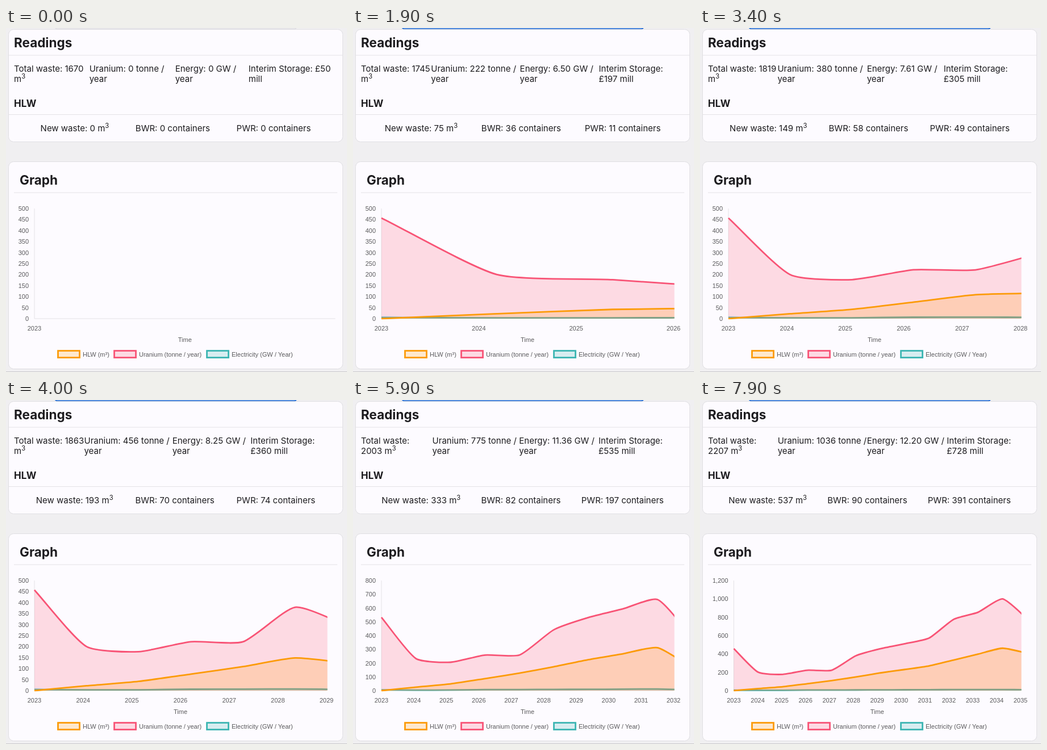
Animation of 600x606 px, one loop 8 s. Source, as an HTML page:

```html
<!DOCTYPE html>
<html lang="en">
<head>
<meta charset="utf-8">
<style>
  html, body { margin: 0; width: 100%; height: 100%; overflow: hidden; background: #f0eff1; }
  svg { display: block; width: 600px; height: 606px; }
  .ui { font: 15px Inter, sans-serif; fill: #1d1c1f; }
  .ui .head { font-size: 22.5px; font-weight: 700; }
  .ui .sub { font-size: 17px; font-weight: 700; }
  .ui .sup { font-size: 11.25px; }
  .chart { font: 11px "Liberation Sans", Arial, sans-serif; fill: #5a5a5c; }
  .card { fill: #fdfbff; stroke: #e0dfe3; }
  .rule { stroke: #e4e2e6; fill: none; }
</style>
</head>
<body>
<svg viewBox="0 0 600 606">
  <defs><clipPath id="area"><rect id="clip" y="316.5" height="197"/></clipPath></defs>
  <rect width="600" height="606" fill="#f0eff1"/>
  <rect id="ring" x="86" y="-20" width="425.5" height="21.3" rx="4" fill="#fdfbff" stroke-width="1.8"/>
  <rect class="card" x="4.5" y="2.5" width="588" height="198" rx="9"/>
  <rect class="card" x="4.5" y="235.5" width="588" height="365" rx="9"/>
  <path class="rule" d="M5 48H592M5 152.5H592M14 290H583"/>
  <path d="M0 605.5H600" stroke="#c9c8cb"/>
  <g class="ui">
    <text class="head" x="14" y="34">Readings</text>
    <text class="sub" x="14" y="138.7">HLW</text>
    <text class="head" x="24" y="276">Graph</text>
    <g id="readings"></g>
  </g>
  <g class="chart">
    <g id="axes"></g>
    <g id="plot" clip-path="url(#area)"></g>
    <g id="legend"></g>
  </g>
</svg>
<script>
const LOOP = 8000, ANIM = 1000, TOP = 318, BOTTOM = 512, RIGHT = 564, TENSION = 0.2;
const START_YEAR = 2023, RING_AT = 100;

// start ms, uranium, energy, HLW, BWR, PWR, storage cost
const YEARS = [
  [0, 457, 5.2, 0, 0, 0, 50],
  [190, 200, 3.4, 22, 12, 0, 97],
  [950, 177, 3.75, 42, 25, 1, 144],
  [1680, 222, 6.5, 75, 36, 11, 197],
  [2407, 222, 6.84, 109, 47, 29, 250],
  [3090, 380, 7.61, 149, 58, 49, 305],
  [3770, 456, 8.25, 193, 70, 74, 360],
  [4430, 510, 9.21, 230, 74, 103, 416],
  [5090, 573, 10.17, 270, 78, 138, 473],
  [5740, 775, 11.36, 333, 82, 197, 535],
  [6370, 853, 11.83, 397, 86, 256, 597],
  [6990, 1005, 12.03, 465, 88, 320, 662],
  [7600, 1036, 12.2, 537, 90, 391, 728]
].map(([at, uranium, energy, hlw, bwr, pwr, cost]) => ({ at, uranium, energy, hlw, bwr, pwr, cost }));

// bottom layer first
const SERIES = [
  { key: 'energy', color: '60,181,178', label: 'Electricity (GW / Year)', x: 353 },
  { key: 'uranium', color: '248,84,118', label: 'Uranium (tonne / year)', x: 190 },
  { key: 'hlw', color: '252,155,8', label: 'HLW (m³)', x: 91 }
];

const $ = id => document.getElementById(id);
const lerp = (a, b, p) => a + (b - a) * p;
const easeOutQuart = p => 1 - (1 - p) ** 4;
const pen = document.createElement('canvas').getContext('2d');
const text = (x, y, s, anchor = 'start') => `<text x="${x}" y="${y}" text-anchor="${anchor}">${s}</text>`;
const cubic = (x, y, s) => `${text(x, y, s + ' m')}`.replace('</text>', `<tspan class="sup" dy="-5.3">3</tspan></text>`);

function measure(s, hasCube) {
  pen.font = '15px Inter, sans-serif';
  const width = pen.measureText(s).width;
  if (!hasCube) return width;
  pen.font = '11.25px Inter, sans-serif';
  return width + pen.measureText('3').width;
}

function layout(k) {
  const peak = Math.max(...YEARS.slice(0, k + 1).map(y => y.uranium));
  const tick = peak <= 500 ? 50 : peak <= 1000 ? 100 : 200;
  const max = Math.ceil(peak / tick) * tick;
  const left = max > 1000 ? 59.5 : 50;
  return { tick, max, left, step: (RIGHT - left) / Math.max(k, 1) };
}

const place = (value, max) => BOTTOM - (BOTTOM - TOP) * value / max;

// Point positions at time t while year k is the newest one.
function points(k, t) {
  if (k === 0) return [];
  const before = points(k - 1, YEARS[k].at);
  const old = layout(k - 1), now = layout(k);
  const p = easeOutQuart(Math.min(1, (t - YEARS[k].at) / ANIM));
  return YEARS.slice(0, k + 1).map((year, i) => {
    const x = now.left + i * now.step;
    const from = before[i] || { x: k === 1 ? x : old.left + i * old.step, y: SERIES.map(() => BOTTOM) };
    return {
      x: lerp(from.x, x, p),
      y: SERIES.map((s, j) => lerp(from.y[j], place(year[s.key], now.max), p))
    };
  });
}

function curve(pts) {
  const handles = pts.map((c, i) => {
    const a = pts[i - 1] || c, b = pts[i + 1] || c;
    const before = Math.hypot(c.x - a.x, c.y - a.y), after = Math.hypot(b.x - c.x, b.y - c.y);
    const k = TENSION / (before + after || 1), dx = b.x - a.x, dy = b.y - a.y;
    const cap = y => Math.min(BOTTOM, Math.max(TOP, y));
    return {
      back: [c.x - dx * k * before, cap(c.y - dy * k * before)],
      ahead: [c.x + dx * k * after, cap(c.y + dy * k * after)]
    };
  });
  return pts.map((c, i) => i
    ? `C${handles[i - 1].ahead} ${handles[i].back} ${c.x},${c.y}`
    : `M${c.x},${c.y}`).join('');
}

function drawReadings(k) {
  const y = YEARS[k];
  const uranium = k ? y.uranium : 0;
  const energy = k ? y.energy.toFixed(2) : 0;
  const total = 1670 + y.hlw;
  const top = [
    [`Total waste: ${total} m`, true],
    [`Uranium: ${uranium} tonne / year`],
    [`Energy: ${energy} GW / year`],
    [`Interim Storage: £${y.cost} mill`]
  ].map(args => measure(...args));
  const shrink = 569 / top.reduce((a, b) => a + b);
  let at = 14;
  const x = top.map(w => { const here = at; at += w * shrink; return here; });
  const costFits = k <= 2 || k === 7;
  const two = (x, a, b) => text(x, 77.3, a) + text(x, 94.6, b);

  let out = total < 2000
    ? text(14, 77.3, `Total waste: ${total}`) + cubic(14, 94.6, '').replace('> m', '>m')
    : text(14, 77.3, 'Total waste:') + cubic(14, 94.6, total);
  out += two(x[1], `Uranium: ${uranium} tonne /`, 'year');
  out += two(x[2], `Energy: ${energy} GW /`, 'year');
  out += costFits
    ? two(x[3], `Interim Storage: £${y.cost}`, 'mill')
    : two(x[3], 'Interim Storage:', `£${y.cost} mill`);

  const row = [`New waste: ${y.hlw}`, `BWR: ${y.bwr} containers`, `PWR: ${y.pwr} containers`];
  const widths = row.map((s, i) => i ? measure(s) : measure(s + ' m', true));
  const gap = (569 - widths.reduce((a, b) => a + b)) / 4;
  at = 14 + gap;
  row.forEach((s, i) => {
    out += i ? text(at, 181.5, s) : cubic(at, 181.5, s);
    at += widths[i] + gap;
  });
  $('readings').innerHTML = out;
}

function drawAxes(k) {
  const { tick, max, left, step } = layout(k);
  const right = k ? RIGHT : 579.5;
  let out = `<path class="rule" d="M${left} ${TOP}V${BOTTOM}H${right}"/>`;
  for (let v = 0; v <= max; v += tick)
    out += text(left - 10, place(v, max) + 4, v.toLocaleString('en-US'), 'end');
  for (let i = 0; i <= k; i++)
    out += text(left + i * step, 532.5, START_YEAR + i, 'middle');
  out += text((left + right) / 2, 552.5, 'Time', 'middle');
  $('axes').innerHTML = out;
  $('clip').setAttribute('x', left - 1.5);
  $('clip').setAttribute('width', right - left + 3);
}

function drawPlot(k, t) {
  const pts = points(k, t);
  $('plot').innerHTML = pts.length ? SERIES.map((s, j) => {
    const line = curve(pts.map(p => ({ x: p.x, y: p.y[j] })));
    return `<path d="${line}L${pts[k].x},${BOTTOM}L${pts[0].x},${BOTTOM}Z" fill="rgba(${s.color},.2)"/>` +
      `<path d="${line}" fill="none" stroke="rgb(${s.color})" stroke-width="2.8"/>`;
  }).join('') : '';
}

$('legend').innerHTML = SERIES.map(s =>
  `<rect x="${s.x + .5}" y="568.6" width="38" height="12" fill="rgba(${s.color},.2)" stroke="rgb(${s.color})" stroke-width="2.8"/>` +
  text(s.x + 44, 578.6, s.label)).join('');

let shown = -1;
const began = performance.now();
function render() {
  const t = (performance.now() - began) % LOOP;
  const k = YEARS.filter(y => y.at <= t).length - 1;
  if (k !== shown) {
    shown = k;
    drawReadings(k);
    drawAxes(k);
  }
  drawPlot(k, t);
  $('ring').setAttribute('stroke', t < RING_AT ? '#dedde1' : '#1463d2');
  requestAnimationFrame(render);
}
render();
</script>
</body>
</html>
```
